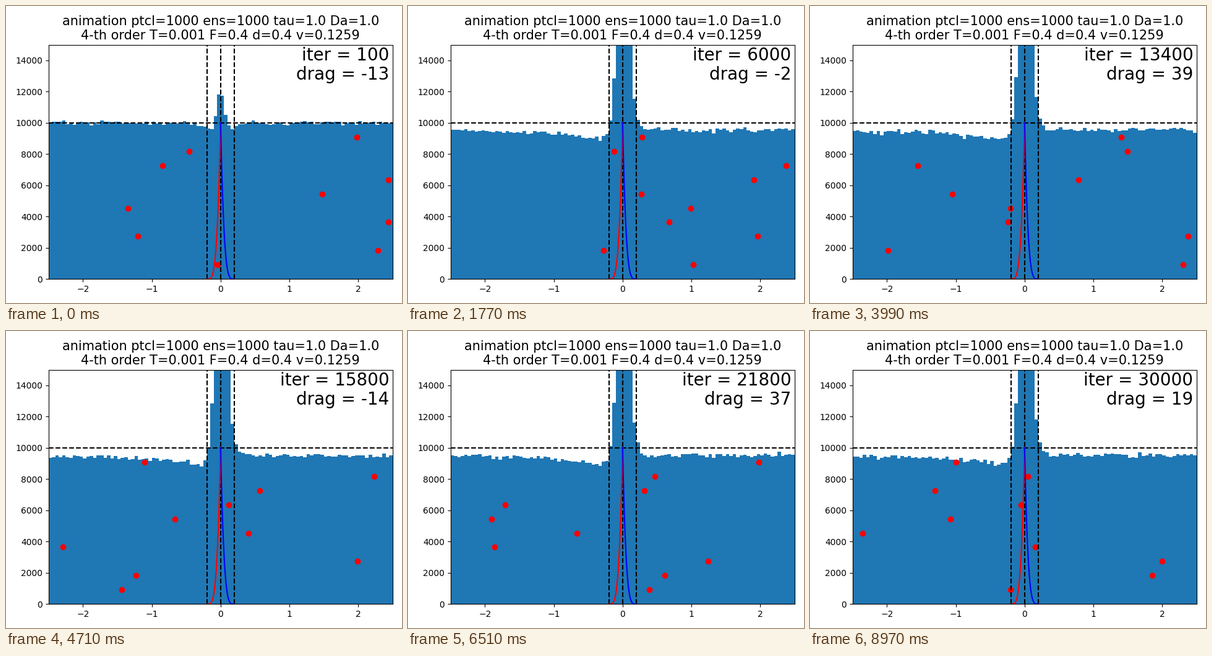
A matplotlib script that plays this animation: 640x480 px, repeating every 9 s.

```python
import matplotlib.pyplot as plt
import numpy as np
from matplotlib.animation import FuncAnimation

FRAMES = 300
STEPS = 100           # iterations per frame
DT = 0.1              # time per frame
TAU, DA = 1.0, 1.0
HALF = 0.2            # half width of the potential
BOX = 5.0
LEVEL = 10000
BINS = 100
START = [-0.04, 2.28, -1.20, 2.44, -1.35, 1.48, 2.44, -0.84, -0.46, 1.98]
DRAG_START, DRAG_MEAN, DRAG_SPREAD = -13, 18, 20

rng = np.random.default_rng(12)


def ou_noise(start, decay):
    """Unit-variance noise with exponential memory, one row per frame."""
    u = np.empty((FRAMES, np.size(start)))
    u[0] = start
    for k in range(1, FRAMES):
        kick = rng.normal(size=np.size(start))
        u[k] = decay * u[k - 1] + np.sqrt(1 - decay**2) * kick
    return u


def active_walks(start):
    """Self-propelled particles in a periodic box."""
    speed = np.sqrt(DA / TAU) * ou_noise(rng.normal(size=len(start)),
                                         np.exp(-DT / TAU))
    x = start + DT * (np.cumsum(speed, axis=0) - speed[0])
    return (x + BOX / 2) % BOX - BOX / 2


edges = np.linspace(-BOX / 2, BOX / 2, BINS + 1)
mid = (edges[1:] + edges[:-1]) / 2
dist = np.abs(mid)

# Early profile: a narrow peak in a shallow dip
first = LEVEL + 2500 * np.exp(-(mid / 0.075)**2) - 480 * np.exp(-(mid / 0.33)**2)

# Settled profile: a tall peak with a depleted wake on its left
wake = np.where(mid < 0, 920 * np.exp(-dist / 0.8), 0)
peak = 70000 * np.exp(-dist / np.where(mid < 0, 0.044, 0.05))
settled = 9520 - wake + np.minimum(peak, 12000)

grain = rng.normal(0, 0.85, (FRAMES, BINS))


def density(k):
    mix = 1 - np.exp(-k * DT / (0.9 + 0.7 * dist))
    mean = first + (settled - first) * mix
    return mean + grain[k] * np.sqrt(mean)


tracks = active_walks(START)
heights = np.linspace(0, LEVEL, len(START) + 2)[1:-1]
swing = ou_noise((DRAG_START - DRAG_MEAN) / DRAG_SPREAD, 0.6)[:, 0]
drag = np.rint(DRAG_MEAN + DRAG_SPREAD * swing).astype(int)

fig, ax = plt.subplots(figsize=(6.4, 4.8), dpi=100)
ax.set_xlim(-BOX / 2, BOX / 2)
ax.set_ylim(0, 1.5 * LEVEL)
ax.set_title("animation ptcl=1000 ens=1000 tau=1.0 Da=1.0\n"
             "4-th order T=0.001 F=0.4 d=0.4 v=0.1259", fontsize=15)

hist = ax.stairs(density(0), edges, fill=True, color="tab:blue", zorder=1)
dots, = ax.plot(tracks[0], heights, "ro", zorder=1.5)
for x in (-HALF, 0, HALF):
    ax.axvline(x, color="k", ls="--")
ax.axhline(LEVEL, color="k", ls="--")
s = np.linspace(0, HALF, 100)
well = LEVEL * (1 - s / HALF)**4
ax.plot(-s, well, "r")
ax.plot(s, well, "b")


def corner_text(y):
    return ax.text(0.99, y, "", transform=ax.transAxes, fontsize=20,
                   ha="right", va="top")


iter_label = corner_text(0.99)
drag_label = corner_text(0.91)
fig.tight_layout()


def update(k):
    hist.set_data(density(k))
    dots.set_xdata(tracks[k])
    iter_label.set_text(f"iter = {STEPS * (k + 1)}")
    drag_label.set_text(f"drag = {drag[k]}")
    return hist, dots, iter_label, drag_label


anim = FuncAnimation(fig, update, frames=FRAMES, interval=30,
                     repeat=True, repeat_delay=0)
plt.show()
```
